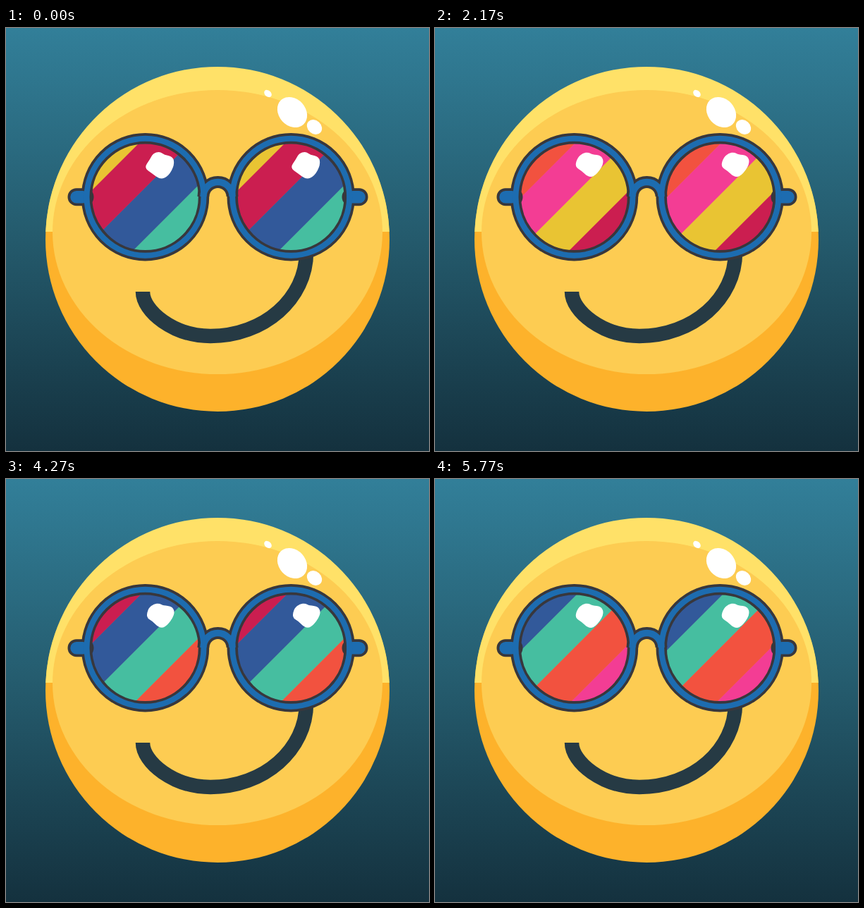
Recreate the animation shown at these times as an HTML page. Size 600 by 600 pixels, loop 5810 ms.

```html
<!DOCTYPE html>
<html lang="en">
<head>
<meta charset="utf-8">
<title>Smiley with striped sunglasses</title>
<style>
  html, body { margin: 0; height: 100%; overflow: hidden; }
  svg { display: block; width: 100%; height: 100%; }
</style>
</head>
<body>
<svg viewBox="0 0 600 600">
  <defs>
    <linearGradient id="sky" x2="0" y2="1">
      <stop stop-color="#327f99"/>
      <stop offset=".5" stop-color="#245a6c"/>
      <stop offset="1" stop-color="#14313e"/>
    </linearGradient>
    <clipPath id="round"><circle cx="197.5" cy="240" r="77"/></clipPath>
    <g id="lens" clip-path="url(#round)">
      <g id="stripes"></g>
      <path id="shine" fill="#fff" stroke="#fff" stroke-width="2"/>
    </g>
    <g id="frame" fill="none" stroke-linecap="round">
      <circle cx="197.5" cy="239.7" r="83"/>
      <circle cx="404.2" cy="239.7" r="83"/>
    </g>
  </defs>

  <rect width="600" height="600" fill="url(#sky)"/>
  <circle cx="300" cy="300" r="244" fill="#fdb22b"/>
  <path d="M56.2 289A244 244 0 0 1 543.8 289z" fill="#ffe168"/>
  <ellipse cx="300" cy="289.5" rx="234" ry="201.5" fill="#fdcc52"/>
  <g fill="#fff">
    <ellipse cx="406" cy="119.5" rx="23.5" ry="19" transform="rotate(48 406 119.5)"/>
    <ellipse cx="437.5" cy="140.5" rx="11.5" ry="9.5" transform="rotate(42 437.5 140.5)"/>
    <ellipse cx="371.5" cy="93" rx="6" ry="4.3" transform="rotate(42 371.5 93)"/>
  </g>
  <path d="M194 374C194 402 238 437 290 437C366 437 426 384 426 318" fill="none" stroke="#263a44" stroke-width="20.5"/>

  <use href="#lens"/>
  <use href="#lens" x="207"/>

  <!-- dark outline first, blue core on top -->
  <g fill="none" stroke="#38373c" stroke-linecap="round">
    <path d="M100 239.7H112M489 239.7H501" stroke-width="25"/>
    <path d="M280 239a20.5 20.5 0 0 1 41 0" stroke-width="17" stroke-linecap="butt"/>
    <use href="#frame" stroke-width="15.4"/>
  </g>
  <g fill="none" stroke="#1d6cb0" stroke-linecap="round">
    <path d="M100 239.7H109M492 239.7H501" stroke-width="17.5"/>
    <path d="M280 239a20.5 20.5 0 0 1 41 0" stroke-width="9.5" stroke-linecap="butt"/>
    <use href="#frame" stroke-width="8"/>
  </g>
</svg>
<script>
const LOOP = 5810, BAND = 72;
const colors = ['#e9c433', '#cb1e50', '#32599a', '#46bea0', '#f2523f', '#f33d94'];
const cycle = BAND * colors.length;
const stripes = document.getElementById('stripes');
const shine = document.getElementById('shine');

for (let k = -6; k < 9; k++) {
  const path = document.createElementNS('http://www.w3.org/2000/svg', 'path');
  path.setAttribute('d', `M${k * BAND} 0h${BAND + 0.5}l-400 400h${-BAND - 0.5}z`);
  path.setAttribute('fill', colors[(k + 6) % 6]);
  stripes.append(path);
}

// step, stripe offset, glint shape (0 = drooping, 1 = upright)
const keys = [
  [0, 280, 0], [25, 16, 1], [65, -430, 0.6], [91, -701, 0],
  [128, -1085, 0.7], [145, -1268, 0.95], [173, -1579, 0.6]
];
const drooping = [[197, 198], [205, 187], [209, 179], [218, 176], [224, 181],
  [236, 183], [238, 194], [230, 209], [219, 214], [207, 205]];
const upright = [[201, 195], [202, 182], [211, 178], [217, 178], [222, 180],
  [236, 181], [239, 192], [224, 210], [216, 208], [209, 199]];

const mix = (a, b, u) => a + (b - a) * u;
const mid = (p, q) => [mix(p[0], q[0], 0.5), mix(p[1], q[1], 0.5)];

function smooth(points) {
  const last = points[points.length - 1];
  return points.reduce((d, p, i) =>
    d + `Q${p} ${mid(p, points[(i + 1) % points.length])}`, `M${mid(last, points[0])}`) + 'z';
}

function draw(now) {
  const step = Math.min(173, Math.floor((now % LOOP + 5) * 0.03));
  const i = Math.max(1, keys.findIndex(key => key[0] >= step));
  const [a, b] = [keys[i - 1], keys[i]];
  const u = (step - a[0]) / (b[0] - a[0]);
  const shift = (mix(a[1], b[1], u) % cycle + cycle) % cycle;
  const pose = mix(a[2], b[2], u);
  stripes.setAttribute('transform', `translate(${shift})`);
  shine.setAttribute('d', smooth(drooping.map((p, j) =>
    p.map((v, axis) => mix(v, upright[j][axis], pose)))));
}

const start = performance.now();
function tick() {
  draw(performance.now() - start);
  requestAnimationFrame(tick);
}
tick();
</script>
</body>
</html>
```
